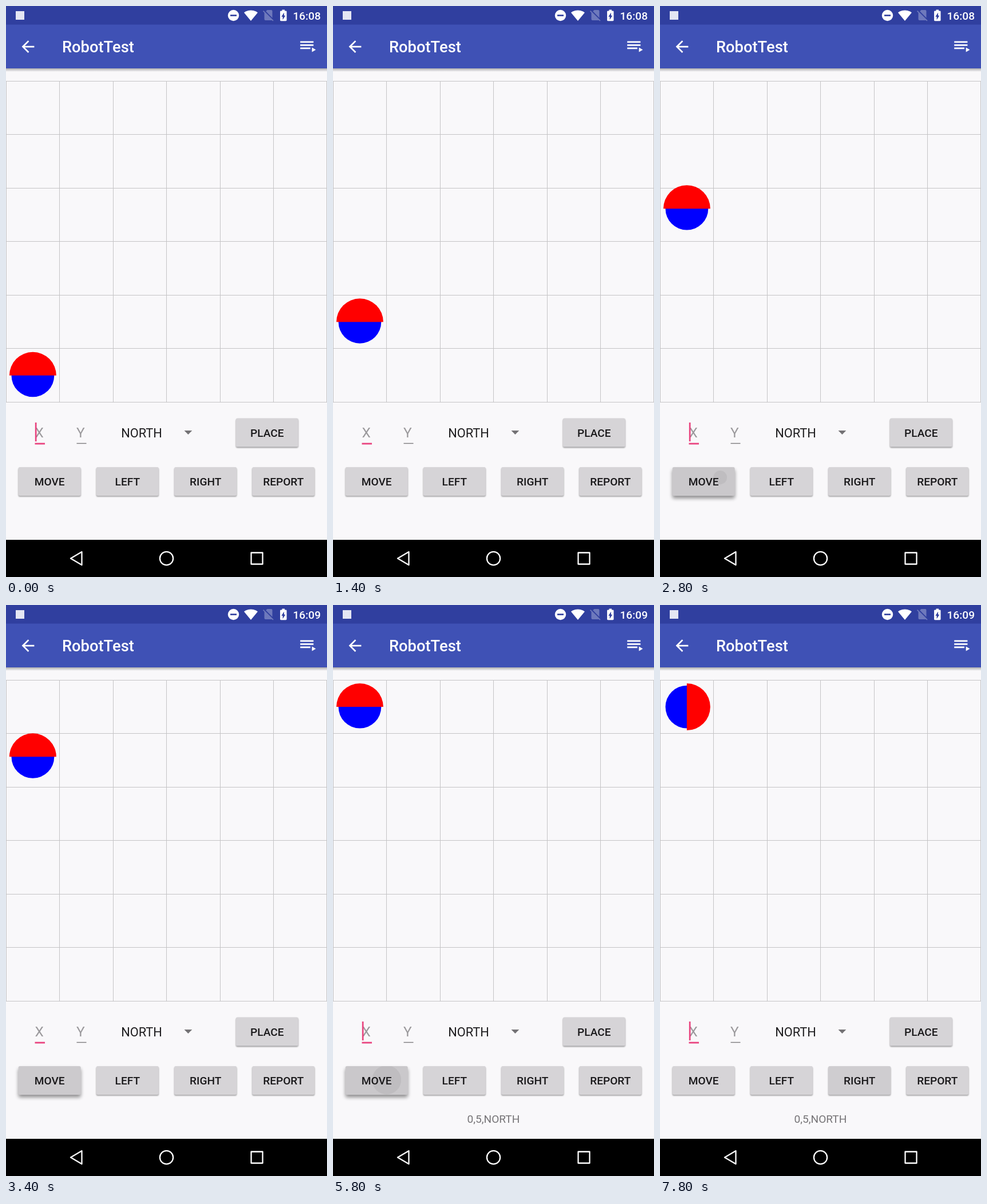
Animation of 561x998 px, one loop 8 s. Source, as an HTML page:

```html
<!DOCTYPE html>
<html lang="en">
<head>
<meta charset="utf-8">
<title>RobotTest</title>
<style>
  html, body { margin: 0; width: 100%; height: 100%; overflow: hidden; background: #f9f8fa; }
  svg { display: block; }
  #stage { width: 100vw; height: 100vh; }
  text { font-family: Roboto, sans-serif; }
  .label { font-size: 19.1px; font-weight: 500; text-anchor: middle; fill: #19181a; }
  .hint { font-size: 24.5px; fill: #9b999c; }
</style>
</head>
<body>
<svg id="stage" viewBox="0 0 561 998" xmlns="http://www.w3.org/2000/svg">
  <defs>
    <linearGradient id="drop" x2="0" y2="1">
      <stop offset="0" stop-color="#000" stop-opacity=".3"/>
      <stop offset="1" stop-color="#000" stop-opacity="0"/>
    </linearGradient>
    <filter id="low" x="-20%" y="-40%" width="140%" height="180%"><feGaussianBlur stdDeviation="1.3"/></filter>
    <filter id="high" x="-20%" y="-40%" width="140%" height="180%"><feGaussianBlur stdDeviation="3"/></filter>
  </defs>
  <rect width="561" height="998" fill="#f9f8fa"/>

  <!-- app bar -->
  <rect y="109" width="561" height="6" fill="url(#drop)"/>
  <rect y="32" width="561" height="77" fill="#3f51b5"/>
  <rect width="561" height="32.5" fill="#303f9f"/>
  <rect x="17" y="9" width="15" height="15" fill="#e4e6f3"/>
  <g fill="#fff">
    <circle cx="397.5" cy="16.5" r="9.7"/>
    <rect x="392" y="15.2" width="11" height="2.6" fill="#303f9f"/>
    <path transform="translate(415.6 4.5) scale(1.03 1)" d="M12 21.5L23.64 7C23.2 6.66 18.7 3 12 3S.81 6.66.36 7z"/>
    <path transform="translate(446.5 4)" opacity=".3" d="M18.99 5c0-1.1-.89-2-1.99-2h-7L7.66 5.34 19 16.68zM3.65 3.88L2.38 5.15 5 7.77V19c0 1.1.9 2 2 2h10c.35 0 .67-.1.96-.26l1.88 1.88 1.27-1.27z"/>
    <path transform="translate(471 4.6) scale(1.15 .98)" d="M15.67 4H14V2h-4v2H8.33C7.6 4 7 4.6 7 5.33v15.33C7 21.4 7.6 22 8.33 22h7.33c.74 0 1.34-.6 1.34-1.33V5.33C17 4.6 16.4 4 15.67 4zM11 20v-5.5H9L13 7v5.5h2z"/>
    <text id="clock" x="550" y="23.8" font-size="19.1" font-weight="500" text-anchor="end">16:08</text>
    <path transform="translate(22.1 54.7) scale(1.364)" d="M20 11H7.83l5.59-5.59L12 4l-8 8 8 8 1.41-1.41L7.83 13H20z"/>
    <text x="98" y="81.4" font-size="27.3" font-weight="500">RobotTest</text>
    <path transform="translate(511.5 54.7) scale(1.364)" d="M19 9H2v2h17zM19 5H2v2h17zM2 15h13v-2H2zM17 13v6l5-3z"/>
  </g>

  <path id="grid" fill="none" stroke="#c5c4c6"/>

  <g id="robot">
    <circle r="37.4" fill="#00f"/>
    <path d="M-41 0A41 41 0 0 1 41 0z" fill="#f00"/>
  </g>

  <!-- form -->
  <text class="hint" x="50.6" y="754">X</text>
  <text class="hint" x="123" y="754">Y</text>
  <rect x="50.5" y="763.6" width="17.5" height="2.8" fill="#e9447f"/>
  <rect x="123.5" y="763.8" width="17" height="1.4" fill="#7d7b7e"/>
  <rect id="caret" x="50.8" y="728" width="2.7" height="33" fill="#e9447f"/>
  <text x="201.2" y="753.8" font-size="21.8" fill="#1e1d1f">NORTH</text>
  <path d="M311.5 742h13.8l-6.9 7z" fill="#747275"/>
  <g id="buttons"></g>
  <text id="report" x="280.5" y="905.4" font-size="19.1" text-anchor="middle" fill="#767477">0,5,NORTH</text>

  <!-- navigation bar -->
  <rect y="933" width="561" height="65" fill="#000"/>
  <g fill="none" stroke="#fff" stroke-width="2.3" stroke-linejoin="round">
    <path d="M113 965.5L132.5 954v23z"/>
    <circle cx="280.5" cy="965.5" r="11.6"/>
    <rect x="428.5" y="955.5" width="20" height="20"/>
  </g>
</svg>
<script>
const LOOP = 8000, STEP = 200, MOVE_MS = 300;
const CELL = 93.55, TOP = 131, W = 109, H = 50;
const $ = id => document.getElementById(id);

let lines = '';
for (let i = 0; i < 7; i++) {
  const x = Math.min(Math.floor(i * CELL), 560) + 0.5;
  const y = Math.floor(TOP + i * CELL) + 0.5;
  lines += `M${x} ${TOP}V692.5M0 ${y}H561`;
}
$('grid').setAttribute('d', lines);

const spots = { PLACE: [401.8, 720.6], MOVE: [21.7, 806], LEFT: [157.8, 806], RIGHT: [294.2, 806], REPORT: [430.3, 806] };
const parts = {};
for (const [name, [x, y]] of Object.entries(spots)) {
  const g = document.createElementNS('http://www.w3.org/2000/svg', 'g');
  const box = `width="${W}" height="${H}" rx="2.7"`;
  g.setAttribute('transform', `translate(${x} ${y})`);
  g.innerHTML = `<rect ${box}/><rect ${box} fill="#d6d4d7"/><rect ${box}/>
    <svg width="${W}" height="${H}" overflow="hidden"><circle/></svg>
    <text class="label" x="${W / 2}" y="32">${name}</text>`;
  $('buttons').append(g);
  const [shadow, , tint] = g.querySelectorAll('rect');
  parts[name] = { shadow, tint, ripple: g.querySelector('circle') };
}

// Touches: ripple centre is relative to the button
const presses = [
  { name: 'MOVE', at: 900, end: 1400, x: 74, y: 22 },
  { name: 'MOVE', at: 1480, end: 2800, x: 74, y: 22 },
  { name: 'MOVE', at: 2733, end: 3200, x: 83.5, y: 18 },
  { name: 'MOVE', at: 3350, end: 3800, x: 74, y: 22 },
  { name: 'REPORT', at: 4200, end: 4800, x: 56, y: 25 },
  { name: 'MOVE', at: 5700, end: 6200, x: 72, y: 24 },
  { name: 'MOVE', at: 6470, end: 7200, x: 70.5, y: 25 },
  { name: 'RIGHT', at: 7350, end: 8000, x: 56, y: 25 }
];
const moves = [900, 1480, 2080, 2733, 3350];
const TURN = 7350;

const clamp = v => Math.max(0, Math.min(1, v));
const ease = v => (1 - Math.cos(Math.PI * clamp(v))) / 2;
const set = (el, attrs) => { for (const k in attrs) el.setAttribute(k, attrs[k]); };

function drawButton(name, t) {
  const { shadow, tint, ripple } = parts[name];
  const p = presses.find(q => q.name === name && t > q.at && t < q.end);
  const age = p ? t - p.at : 0;
  const raised = age > 0 && age < 110;
  set(shadow, { y: raised ? 4.5 : 1.6, filter: `url(#${raised ? 'high' : 'low'})`, opacity: raised ? 0.42 : 0.38 });
  const fade = age > 400 ? 0.6 : 1;
  set(tint, { opacity: 0.055 * clamp(age / 60) * fade });
  set(ripple, {
    cx: p ? p.x : 0, cy: p ? p.y : 0,
    r: Math.max(0, 0.41 * (age - 38)),
    opacity: 0.055 * clamp((300 - age) / 100)
  });
}

function draw(t) {
  const rows = moves.reduce((n, at) => n + ease((t - at) / MOVE_MS), 0);
  const y = TOP + (5.5 - rows) * CELL;
  const turn = 90 * ease((t - TURN) / MOVE_MS);
  set($('robot'), { transform: `translate(46.9 ${y + 0.3}) rotate(${turn})` });

  const phase = t % 1000;
  set($('caret'), { opacity: phase < 400 || phase >= 800 ? 1 : 0 });
  set($('report'), { opacity: t >= 4400 ? 1 : 0 });
  $('clock').textContent = t < 3200 ? '16:08' : '16:09';
  for (const name in parts) drawButton(name, t);
}

const start = performance.now();
function tick() {
  const t = (performance.now() - start) % LOOP;
  draw(Math.floor(t / STEP) * STEP);
  requestAnimationFrame(tick);
}
draw(0);
requestAnimationFrame(tick);
</script>
</body>
</html>
```
